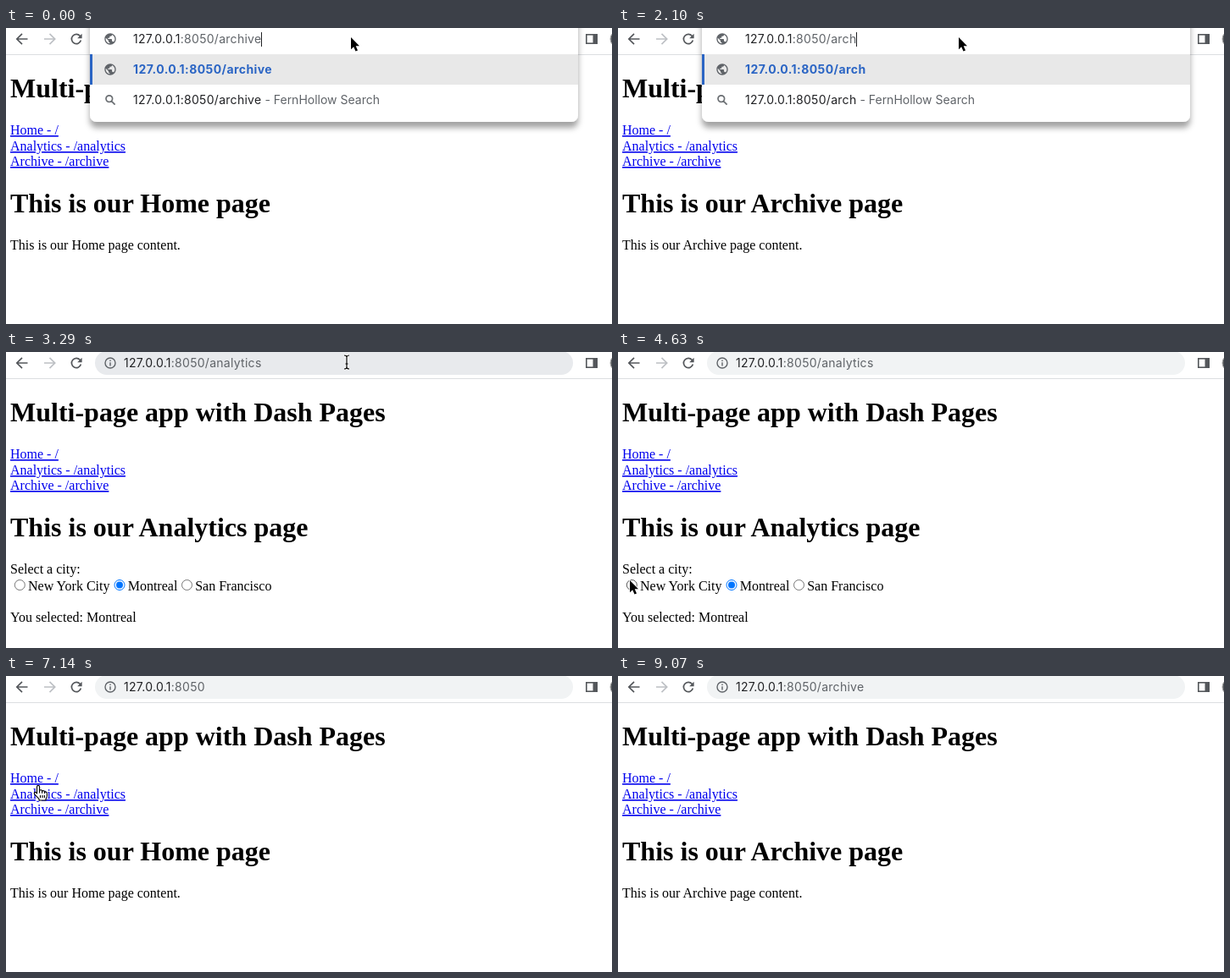
Animation of 715x350 px, one loop 9670 ms. Source, as an HTML page:

```html
<!DOCTYPE html>
<html lang="en">
<head>
<meta charset="utf-8">
<title>Multi-page app</title>
<style>
html, body { margin: 0; width: 100%; height: 100%; overflow: hidden; background: #fff }
svg { display: block; width: 715px; height: 350px }
text { font: 16px "Liberation Serif", Times, serif }
.h1 { font-size: 32px; font-weight: bold }
.link { fill: #00e; text-decoration: underline }
.ui { font: 14px Inter, Roboto, sans-serif; fill: #202124; letter-spacing: .28px }
.ui tspan { fill: #5f6368 }
.ui .note { letter-spacing: 0 }
.ui.match { font-weight: 700; fill: #2b65c4; letter-spacing: .42px }
.line { fill: none; stroke-width: 1.7 }
</style>
</head>
<body>
<svg id="stage" viewBox="0 0 715 350">
  <defs>
    <filter id="shadow" x="-10%" y="-20%" width="120%" height="150%">
      <feDropShadow dx="0" dy="7" stdDeviation="3.5" flood-opacity=".36"/>
    </filter>
    <path id="globe" transform="scale(.67) translate(-12 -12)" fill="#5f6368" d="M12 2C6.48 2 2 6.48 2 12s4.48 10 10 10 10-4.48 10-10S17.52 2 12 2zm-1 17.93c-3.95-.49-7-3.85-7-7.93 0-.62.08-1.21.21-1.79L9 15v1c0 1.1.9 2 2 2v1.93zm6.9-2.54c-.26-.81-1-1.39-1.9-1.39h-1v-3c0-.55-.45-1-1-1H8v-2h2c.55 0 1-.45 1-1V7h2c1.1 0 2-.9 2-2v-.41c2.93 1.19 5 4.06 5 7.41 0 2.08-.8 3.97-2.1 5.39z"/>
    <g id="info" stroke="#5f6368" fill="none" stroke-width="1.4">
      <circle r="6"/><path d="M0 -.8V3.4M0 -3.4V-2"/>
    </g>
    <path id="arrow" d="M0 0V14.2L3.2 11.3 5.5 16.5 8 15.4 5.7 10.3H10Z" stroke="#fff" stroke-width="1.6" paint-order="stroke"/>
    <g id="beam" fill="none">
      <path d="M-3 -8Q0 -8 0 -6Q0 -8 3 -8M0 -6V6M-3 8Q0 8 0 6Q0 8 3 8M-1.5 2H1.5" stroke="#fff" stroke-width="3"/>
      <path d="M-3 -8Q0 -8 0 -6Q0 -8 3 -8M0 -6V6M-3 8Q0 8 0 6Q0 8 3 8M-1.5 2H1.5" stroke="#000" stroke-width="1.2"/>
    </g>
    <g id="hand" stroke="#000" stroke-width="1.1" stroke-linejoin="round">
      <path d="M-1.5 7.5V1Q-1.4 -.6 0 -.6Q1.5 -.6 1.6 1V5.2Q4 4 4.6 6Q7 5 7.6 7Q10.3 6.4 10.4 9V12Q10 14.5 9 15.2V17H1V15.3L-4.5 9.6Q-5.2 7.6 -3.4 7.4Q-2.6 7.4 -1.5 9Z" fill="#fff"/>
      <path d="M1.6 5.2V8.5M4.6 6V8.7M7.6 7V9M2.5 11V14M5 11V14M7.4 11V14" fill="none"/>
    </g>
  </defs>
  <g id="view"></g>
</svg>
<script>
const LOOP = 9670, HOST = '127.0.0.1', PORT = ':8050', INK = '#54575b';
const view = document.getElementById('view');
const pen = document.createElement('canvas').getContext('2d');
pen.font = '14px Inter, Roboto, sans-serif';
pen.letterSpacing = '.28px';

const pages = [[0, 'Home'], [150, 'Archive'], [3290, 'Analytics'], [6840, 'Home'], [7580, 'Analytics'], [8770, 'Archive']];
const paths = [[0, '/archive'], [3140, '/analytics'], [6840, ''], [7580, '/analytics'], [8770, '/archive']];
const cities = [[0, 'Montreal'], [4780, 'New York City'], [5810, 'San Francisco'], [6840, 'Montreal']];
const bars = [[0, 'popup'], [150, 'idle'], [1350, 'select'], [1500, 'caret'], [2100, 'popup'], [3140, 'idle']];
const typed = [[0, 'archive'], [2100, 'arch'], [2250, ''], [2400, 'an'], [2550, 'anal'], [2690, 'analyt'], [2840, 'analytic'], [2990, 'analytics']];
const pointer = [
  [0, 'arrow', 407, 11], [150, 'beam', 407, 12], [750, 'beam', 405, 12], [900, 'beam', 402, 12],
  [2100, 'arrow', 402, 11], [3140, 'beam', 402, 12], [3590, 'arrow', 245, 44], [3730, ''],
  [4030, 'arrow', 52, 255], [4180, 'arrow', 34, 261], [4330, 'arrow', 22, 267], [4480, 'arrow', 16, 270],
  [4630, 'arrow', 14, 270], [4930, 'arrow', 66, 277], [5070, 'arrow', 130, 277],
  [5220, 'arrow', 166, 279], [5360, 'arrow', 200, 278], [5510, 'arrow', 209, 277],
  [5960, 'arrow', 160, 232], [6100, 'arrow', 98, 176], [6250, 'hand', 66, 138],
  [6400, 'hand', 48, 126], [6550, 'hand', 37, 120],
  [7140, 'hand', 38, 130], [7290, 'hand', 40, 138], [7730, 'hand', 39, 145],
  [7880, 'hand', 37, 158], [8020, 'arrow', 35, 171],
  [8320, 'hand', 36, 162], [8470, 'hand', 37, 157], [8920, 'arrow', 52, 178], [9070, '']
];

const at = (list, t) => list.findLast(k => k[0] <= t);
const text = (x, y, s, cls = '') => `<text x="${x}" y="${y}" class="${cls}">${s}</text>`;
const use = (id, x, y) => `<use href="#${id}" x="${x}" y="${y}"/>`;
const rect = (x, y, w, h, fill, more = '') => `<rect x="${x}" y="${y}" width="${w}" height="${h}" fill="${fill}" ${more}/>`;
const line = (d, color) => `<path class="line" d="${d}" stroke="${color}"/>`;
const icon = (id, x, y) => `<g transform="translate(${x} ${y})">${use(id, 0, 0)}</g>`;
const urlWidth = path => pen.measureText(HOST + PORT + path).width;
const address = (x, path) => text(x, 18, `${HOST}<tspan>${PORT}${path}</tspan>`, 'ui');
const caret = x => rect(Math.round(x), 5, 1, 17, '#202124');

const toolbar = rect(0, 31, 715, 1, '#dcdee1')
  + line('M25.5 13H13M19 6.8L12.8 13L19 19.2', INK)
  + line('M45 13H57.5M51.5 6.8L57.7 13L51.5 19.2', '#bdc0c4')
  + line('M87.3 9.4A5.6 5.6 0 1 0 88.4 14.6', INK)
  + `<path d="M89.6 6.8V12.2H84.2Z" fill="${INK}"/>`
  + rect(684.8, 7.8, 12.4, 10.4, 'none', `stroke="${INK}" stroke-width="1.6"`)
  + rect(692.5, 8, 4.5, 10, INK)
  + '<circle cx="723" cy="13" r="10" fill="#55585c" stroke="#aaa"/>';

function omnibox(bar, path, hover) {
  const width = urlWidth(path), focus = bar != 'idle';
  return rect(105, -1, 564, 28, focus ? '#fff' : hover ? '#e8eaed' : '#f1f3f4',
      'rx="14"' + (focus ? ' stroke="#1a73e8" stroke-width="2"' : ''))
    + icon(focus ? 'globe' : 'info', 123, 13)
    + (bar == 'select' ? rect(139, 4, width, 18, '#b4d5fe') : '')
    + address(139, path)
    + (bar == 'caret' ? caret(139 + width) : '');
}

function popup(path) {
  const url = HOST + PORT + path;
  return rect(99, -20, 576, 131, '#fff', 'rx="8" filter="url(#shadow)"')
    + rect(99, 31, 576, 36, '#e8e8e8') + rect(99, 31, 3, 36, '#2b65c4')
    + icon('globe', 123, 13) + icon('globe', 123, 49)
    + line('M124.6 86.6L128.6 90.6M125.6 83.6A3.8 3.8 0 1 1 118 83.6A3.8 3.8 0 1 1 125.6 83.6', '#6b6f73')
    + address(150, path) + caret(150 + urlWidth(path))
    + text(150, 54, url, 'ui match')
    + text(150, 90, `${url}<tspan class="note"> - FernHollow Search</tspan>`, 'ui');
}

function radio(x, label, city, px, py) {
  const on = label == city;
  const hover = Math.hypot(px - x, py - 276) < 7;
  const color = on ? (hover ? '#005cc8' : '#0075ff') : hover ? '#4f4f4f' : '#767676';
  return `<circle cx="${x}" cy="275.5" r="6" fill="#fff" stroke="${color}"/>`
    + (on ? `<circle cx="${x}" cy="275.5" r="4" fill="${color}"/>` : '')
    + text(x + 9.7, 282, label);
}

function content(page, city, px, py) {
  const head = text(5, 82, 'Multi-page app with Dash Pages', 'h1')
    + ['Home - /', 'Analytics - /analytics', 'Archive - /archive']
      .map((s, i) => text(5, Math.round(126 + i * 18.5), s, 'link')).join('')
    + text(5, 218, `This is our ${page} page`, 'h1');
  if (page != 'Analytics') return head + text(5, 262, `This is our ${page} page content.`);
  return head + text(5, 262, 'Select a city:')
    + radio(16.3, 'New York City', city, px, py)
    + radio(134, 'Montreal', city, px, py)
    + radio(213.5, 'San Francisco', city, px, py)
    + text(5, 319, `You selected: ${city}`);
}

let last = '';
function draw(now) {
  const t = now % LOOP;
  const [, kind, px, py] = at(pointer, t);
  const bar = at(bars, t)[1];
  const svg = content(at(pages, t)[1], at(cities, t)[1], px, py)
    + toolbar
    + (bar == 'popup' ? popup('/' + at(typed, t)[1]) : omnibox(bar, at(paths, t)[1], kind == 'beam'))
    + (kind ? use(kind, px, py) : '');
  if (svg != last) view.innerHTML = last = svg;
  requestAnimationFrame(draw);
}
draw(performance.now());
</script>
</body>
</html>
```
